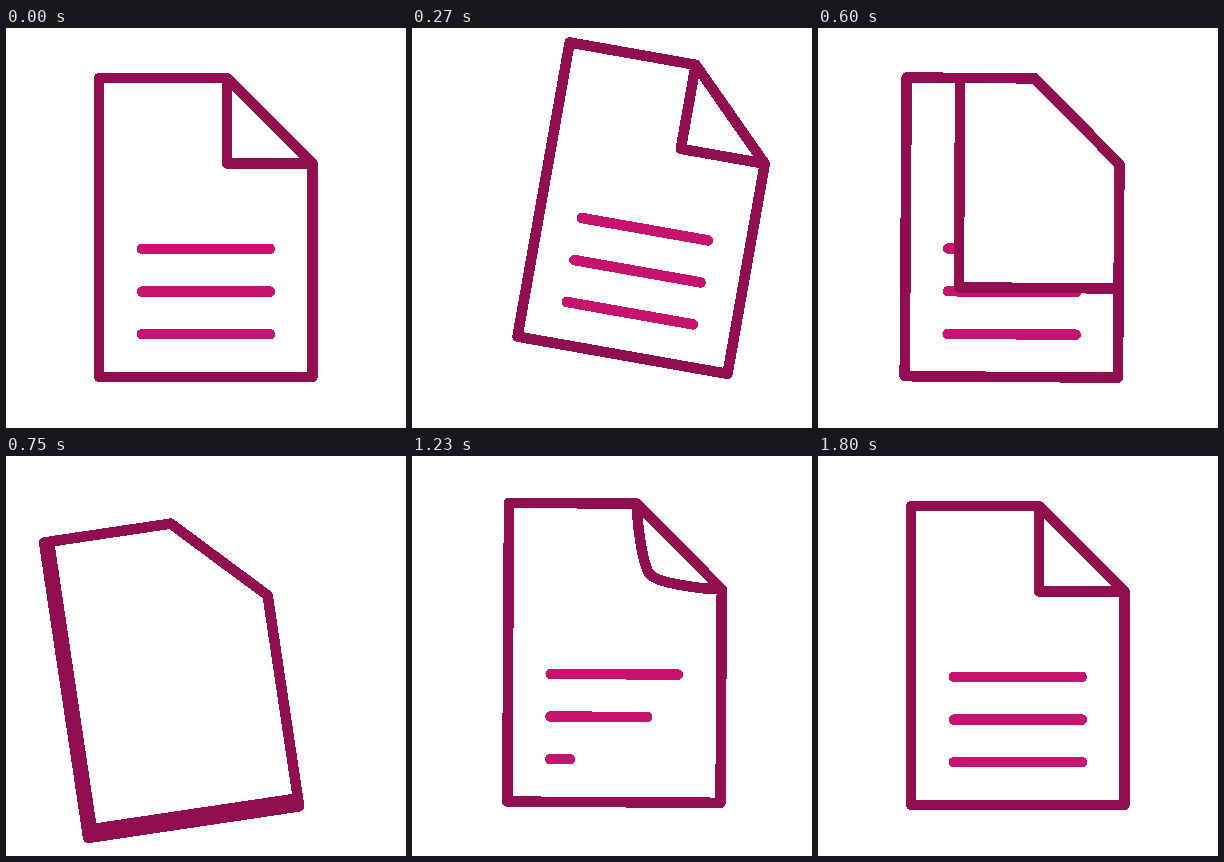
Recreate the animation shown at these times as an HTML page. Size 400 by 400 pixels, loop 3860 ms.

```html
<!DOCTYPE html>
<html lang="en">
<head>
<meta charset="utf-8">
<title>Page turn</title>
<style>
  html, body { margin: 0; width: 100%; height: 100%; overflow: hidden; background: #fff; }
  svg { display: block; width: 100%; height: 100%; shape-rendering: crispEdges; }
  path { fill: none; stroke: #910f50; stroke-width: 10.5; stroke-linecap: round; stroke-linejoin: round; }
  .line { stroke: #c81270; }
  #cover { fill: #fff; stroke: none; }
</style>
</head>
<body>
<svg viewBox="0 0 400 400">
  <g id="page">
    <path id="oldLines" class="line"/>
    <path id="cover"/>
    <path id="newLines" class="line"/>
    <path id="sheet"/>
    <path id="corner"/>
    <path d="M93.2 50.2H221.2L306.5 135.5V348.9H93.2Z"/>
  </g>
</svg>
<script>
const LOOP = 3860, STEP = 30, TURN_END = 870;
const LEFT = 93.2, TOP = 50.2, RIGHT = 306.5, BOTTOM = 348.9;
const FOLD_X = 221.2, FOLD_Y = 135.5;
const LINE_X = 135.9, LINE_W = 128, ROWS = [220.9, 263.6, 306.2];

const el = id => document.getElementById(id);
const clamp = u => Math.min(1, Math.max(0, u));
const mix = (a, b, u) => a + (b - a) * u;
const smooth = u => u * u * (3 - 2 * u);
const steep = u => u ** 2.4 / (u ** 2.4 + (1 - u) ** 2.4);
const out = u => 1 - (1 - u) ** 2;
const span = (t, from, to, ease) => ease(clamp((t - from) / (to - from)));

// Keys: [time, value, ease used to get there]
const tracks = {
  x: [[0, 0], [310, 38.5, smooth], [850, -36.3, steep], [897, -36.3, smooth], [1375, 14, smooth], [1750, 0, smooth]],
  y: [[0, 0], [335, -21.5, smooth], [860, 20.6, steep], [900, 20.6, smooth], [1355, -8, smooth], [1750, 0, smooth]],
  turn: [[0, 0], [290, 10.2, smooth], [920, -10.2, steep], [938, -10.2, smooth], [1400, 5, smooth], [1800, 0, smooth]]
};

function at(keys, t) {
  const i = keys.findIndex(k => k[0] > t);
  if (i < 0) return keys[keys.length - 1][1];
  const [t0, v0] = keys[i - 1], [t1, v1, ease] = keys[i];
  return mix(v0, v1, span(t, t0, t1, ease));
}

const rows = widths => ROWS.map((y, i) => widths[i] > 0 ? `M${LINE_X} ${y}h${widths[i]}` : '').join('');

// The corner starts flat on the diagonal and bends out to a sharp fold.
function cornerPath(p) {
  const x = mix((FOLD_X + RIGHT) / 2, FOLD_X, p);
  const y = mix((TOP + FOLD_Y) / 2, FOLD_Y, p);
  const h = 25 * (1 - p), pull = 28 * p;
  return `M${FOLD_X} ${TOP}C${FOLD_X} ${TOP + pull} ${x - h} ${y - h} ${x} ${y}` +
    `C${x + h} ${y + h} ${RIGHT - pull} ${FOLD_Y} ${RIGHT} ${FOLD_Y}`;
}

function draw(t) {
  const x = at(tracks.x, t), y = at(tracks.y, t);
  el('page').setAttribute('transform', `translate(${x} ${y}) rotate(${at(tracks.turn, t)} 199.85 199.55)`);

  const turning = t < TURN_END;
  const p = span(t, 290, TURN_END, steep);
  const fx = mix(FOLD_X, LEFT, p), fy = mix(FOLD_Y, BOTTOM, p);
  const fold = `M${fx} ${TOP}V${fy}H${RIGHT}`;
  el('oldLines').setAttribute('d', turning ? rows([LINE_W, LINE_W, LINE_W]) : '');
  el('cover').setAttribute('d', turning ? `${fold}V${FOLD_Y}L${FOLD_X} ${TOP}Z` : '');
  el('sheet').setAttribute('d', turning ? fold : '');

  el('newLines').setAttribute('d', rows(ROWS.map((_, i) => {
    const start = 770 + 210 * i;
    return LINE_W * span(t, start, start + 495, out);
  })));
  el('corner').setAttribute('d', cornerPath(span(t, 860, 1460, smooth)));
}

const begin = performance.now();
function tick() {
  const t = (performance.now() - begin) % LOOP;
  draw(Math.floor(t / STEP) * STEP);
  requestAnimationFrame(tick);
}
tick();
</script>
</body>
</html>
```
